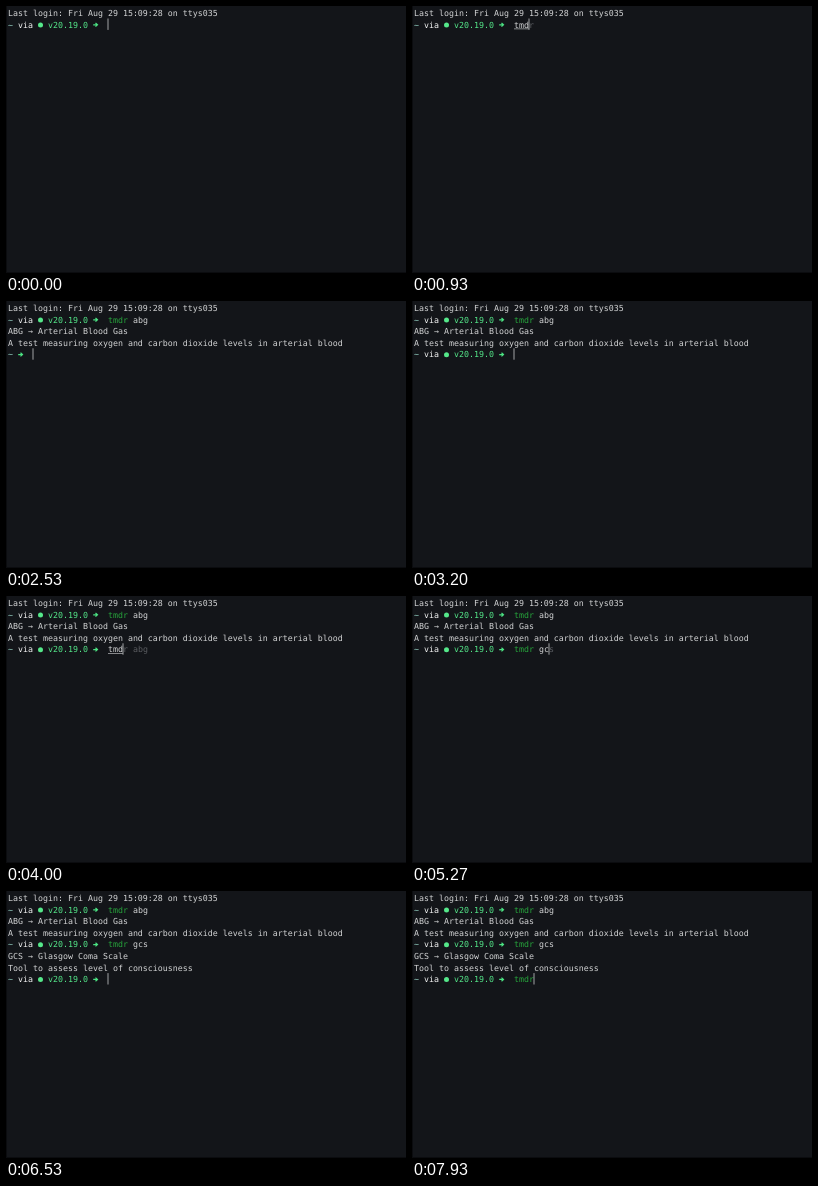
These frames come from a looping animation (400 by 267 pixels, 8000 ms). An HTML page:

```html
<!DOCTYPE html>
<html lang="en">
<head>
<meta charset="utf-8">
<title>Terminal session</title>
<style>
  html, body { margin: 0; width: 100%; height: 100%; overflow: hidden; background: #131519; }
  svg { display: block; width: 400px; height: 267px; }
  text {
    font: 8.306px "DejaVu Sans Mono", monospace;
    white-space: pre;
    text-rendering: geometricPrecision;
  }
</style>
</head>
<body>
<svg id="stage" viewBox="0 0 400 267">
  <rect width="400" height="267" fill="#131519"/>
  <path d="M.5 0V267M0 266.5H400" stroke="#0b0c0f" fill="none"/>
  <g id="screen"></g>
</svg>
<script>
const LOOP = 8000, CELL = 5, LEFT = 2, PITCH = 11.6, INPUT_COL = 20;
const C = {
  text: '#d3d4d5', bold: '#f4f5f5', node: '#55e88a', arrow: '#4be282',
  path: '#9ad9c9', command: '#27a53c', ghost: '#5a5c60', cursor: '#a2a4a6'
};

// Each key: [time, typed so far, suggestion after the cursor]
const sessions = [
  {
    row: 1, full: 0,
    keys: [[330, 't', 'mdr'], [600, 'tm', 'dr'], [870, 'tmd', 'r'], [1000, 'tmdr', ''],
           [1200, 'tmdr ', ''], [1400, 'tmdr a', 'bg'], [1600, 'tmdr ab', 'g'], [1870, 'tmdr abg', '']],
    enter: 2070, reply: 2400,
    lines: ['ABG → Arterial Blood Gas',
            'A test measuring oxygen and carbon dioxide levels in arterial blood']
  },
  {
    row: 4, show: 2470, full: 2600,
    keys: [[3600, 't', 'mdr abg'], [3800, 'tm', 'dr abg'], [4000, 'tmd', 'r abg'], [4200, 'tmdr', ' abg'],
           [4400, 'tmdr ', 'abg'], [5070, 'tmdr g', 'cs'], [5270, 'tmdr gc', 's'], [5470, 'tmdr gcs', '']],
    enter: 5670, reply: 6070,
    lines: ['GCS → Glasgow Coma Scale', 'Tool to assess level of consciousness']
  },
  {
    row: 7, show: 6200, full: 6330,
    keys: [[7400, 't', 'mdr gcs'], [7530, 'tm', 'dr gcs'], [7730, 'tmd', 'r gcs'], [7930, 'tmdr', '']],
    enter: Infinity, reply: Infinity, lines: []
  }
];

const screen = document.getElementById('screen');
const colX = col => LEFT + col * CELL;
const baseY = row => 10 + row * PITCH;

function text(row, col, str, fill, bold) {
  if (!str) return '';
  const weight = bold ? ' font-weight="700"' : '';
  return `<text x="${colX(col)}" y="${baseY(row)}" fill="${fill}"${weight}>${str}</text>`;
}

function arrow(row, col, fill) {
  const x = colX(col), y = baseY(row) - 2.8;
  return `<path d="M${x + .2} ${y}h3.4M${x + 2.5} ${y - 1.8}l2 1.8l-2 1.8" fill="none" stroke="${fill}" stroke-width="1.2"/>`;
}

function cursor(row, col) {
  return `<rect x="${colX(col) - .5}" y="${baseY(row) - 9.1}" width="1" height="11.4" fill="${C.cursor}"/>`;
}

function prompt(row, full) {
  const dir = text(row, 0, '~', C.path, true);
  if (!full) return dir + arrow(row, 2, C.arrow);
  return dir + text(row, 2, 'via', C.bold, true) +
    `<circle cx="${colX(6.5)}" cy="${baseY(row) - 2.7}" r="2.5" fill="${C.node}"/>` +
    text(row, 8, 'v20.19.0', C.node, true) + arrow(row, 17, C.arrow);
}

function input(row, typed, ghost) {
  const word = typed.slice(0, 4), done = word === 'tmdr';
  let out = text(row, INPUT_COL, word, done ? C.command : C.text);
  if (word && !done) {
    out += `<rect x="${colX(INPUT_COL)}" y="${baseY(row) + 1}" width="${word.length * CELL}" height=".6" fill="${C.text}"/>`;
  }
  const rest = typed.slice(5);
  return out + text(row, INPUT_COL + 5, rest, C.text) +
    text(row, INPUT_COL + typed.length + ghost.search(/\S|$/), ghost.trim(), C.ghost);
}

function session(s, t) {
  if (t < (s.show || 0)) return '';
  const full = t >= s.full;
  let typed = '', ghost = '';
  for (const [at, str, hint] of s.keys) {
    if (t >= at) { typed = str; ghost = hint; }
  }
  let out = prompt(s.row, full) + input(s.row, typed, ghost);
  if (t < s.enter) return out + cursor(s.row, full ? INPUT_COL + typed.length : 5);
  if (t < s.reply) return out + cursor(s.row + 1, 0);
  s.lines.forEach((line, i) => { out += text(s.row + 1 + i, 0, line, C.text); });
  const next = sessions[sessions.indexOf(s) + 1];
  return t < next.show ? out + cursor(next.row, 0) : out;
}

let last = '';
function draw(t) {
  const out = text(0, 0, 'Last login: Fri Aug 29 15:09:28 on ttys035', C.text) +
    sessions.map(s => session(s, t)).join('');
  if (out !== last) screen.innerHTML = last = out;
}

function tick() {
  draw(performance.now() % LOOP);
  requestAnimationFrame(tick);
}
tick();
</script>
</body>
</html>
```
